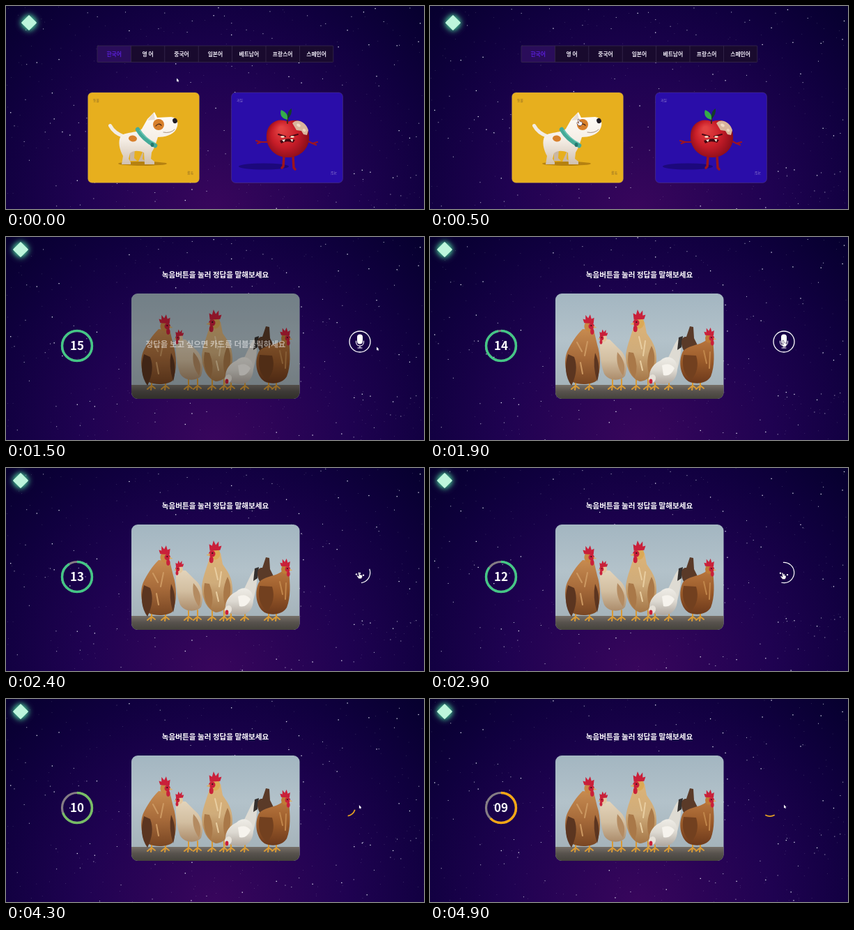
These frames come from a looping animation (600 by 291 pixels, 5000 ms). An HTML page with a canvas:

```html
<!DOCTYPE html>
<html lang="ko">
<head>
<meta charset="utf-8">
<title>Word card game</title>
<style>
html, body { margin: 0; width: 100%; height: 100%; overflow: hidden; background: #0a0030; }
canvas { display: block; width: 600px; height: 291px; }
</style>
</head>
<body>
<canvas id="stage" width="600" height="291"></canvas>
<script>
const W = 600, H = 291, LOOP = 5000, STEP = 100;
const START_AT = 700, GAME_AT = 1200, LISTEN_AT = 2100, CHECK_AT = 4300;
const FONT = '"Noto Sans CJK KR", "Noto Sans CJK", sans-serif';
const c = document.getElementById('stage').getContext('2d');
const rad = d => d * Math.PI / 180;
const clamp = v => Math.max(0, Math.min(1, v));
const mix = (a, b, p) => a + (b - a) * p;

// ---------- helpers ----------
function path(d, fill, stroke, width = 1) {
  const p = new Path2D(d);
  if (fill) { c.fillStyle = fill; c.fill(p); }
  if (stroke) {
    c.strokeStyle = stroke;
    c.lineWidth = width;
    c.lineCap = c.lineJoin = 'round';
    c.stroke(p);
  }
}

function oval(x, y, rx, ry, fill, turn = 0) {
  c.beginPath();
  c.ellipse(x, y, rx, ry, rad(turn), 0, 7);
  c.fillStyle = fill;
  c.fill();
}

function box(x, y, w, h, r, fill, stroke, width = 1) {
  c.beginPath();
  c.roundRect(x, y, w, h, r);
  if (fill) { c.fillStyle = fill; c.fill(); }
  if (stroke) { c.strokeStyle = stroke; c.lineWidth = width; c.stroke(); }
}

function arc(x, y, r, from, to, color, width) {
  c.beginPath();
  c.arc(x, y, r, rad(from), rad(to));
  c.strokeStyle = color;
  c.lineWidth = width;
  c.lineCap = 'butt';
  c.stroke();
}

function label(s, x, y, size, color, weight = 700) {
  c.font = `${weight} ${size}px ${FONT}`;
  c.textAlign = 'center';
  c.textBaseline = 'alphabetic';
  c.fillStyle = color;
  c.fillText(s, x, y + size * 0.36);
}

function shade(y0, y1, ...colors) {
  const g = c.createLinearGradient(0, y0, 0, y1);
  colors.forEach((k, i) => g.addColorStop(i / (colors.length - 1), k));
  return g;
}

// ---------- sky ----------
function random(seed) {
  return () => (seed = seed * 16807 % 2147483647) / 2147483647;
}

// Three star layers rise at different speeds and wrap around
const TILE = 625;
const layers = [
  { n: 600, size: 0.5, speed: 20, alpha: 0.6 },
  { n: 190, size: 0.95, speed: 10, alpha: 0.9 },
  { n: 90, size: 1.25, speed: 6.7, alpha: 1 }
].map((l, i) => {
  const next = random(4271 + i * 977);
  return { ...l, stars: Array.from({ length: l.n }, () => [next() * TILE, next() * TILE]) };
});

function sky(t) {
  c.save();
  c.translate(300, H);
  c.scale(424, 411);
  const g = c.createRadialGradient(0, 0, 0, 0, 0, 1);
  g.addColorStop(0, '#38065c');
  g.addColorStop(0.45, '#1f0251');
  g.addColorStop(0.75, '#10003f');
  g.addColorStop(1, '#06002e');
  c.fillStyle = g;
  c.fillRect(-1, -1, 2, 1);
  c.restore();
  for (const l of layers) {
    c.fillStyle = `rgba(240,240,255,${l.alpha})`;
    for (const [x, y] of l.stars) {
      const sy = (y - l.speed * t / 1000 + TILE) % TILE;
      if (sy < H) c.fillRect(x, sy, l.size, l.size);
    }
  }
}

function gem(x, y) {
  c.save();
  c.translate(x, y);
  c.rotate(Math.PI / 4);
  c.shadowColor = '#4fd6a0';
  c.shadowBlur = 10;
  for (let i = 0; i < 2; i++) box(-7.8, -7.8, 15.6, 15.6, 1, '#bdf5dc');
  c.restore();
}

// ---------- category page ----------
const langs = ['한국어', '영 어', '중국어', '일본어', '베트남어', '프랑스어', '스페인어'];

function tabs() {
  const x = 131, y = 57, w = 48.4, h = 23.5;
  langs.forEach((name, i) => {
    c.fillStyle = i ? '#190a2e' : '#2a0d5a';
    c.fillRect(x + i * w, y, w, h);
    if (i) {
      c.fillStyle = '#372a4c';
      c.fillRect(x + i * w - 0.4, y, 0.8, h);
    }
    label(name, x + (i + 0.5) * w, y + 11.8, 7.8, i ? '#eeeaf5' : '#5a1fd8');
  });
  box(x, y, w * 7, h, 1, null, '#372a4c', 0.8);
}

function card(x, color, name, ink) {
  box(x, 124, 160, 129.5, 6, color, 'rgba(120,110,130,.45)', 0.6);
  label(name, x + 12, 135, 4.8, ink, 500);
  c.save();
  c.translate(x + 147, 240);
  c.rotate(Math.PI);
  label(name, 0, 0, 4.8, ink, 500);
  c.restore();
}

function dog() {
  oval(196, 226, 35, 3, 'rgba(120,75,0,.45)');
  path('M149.5 171.5Q155 182 169 187', null, '#f2ece4', 5);
  path('M185 205L184 218L188 222H178V205ZM198 205L196 219L200 223H190Z', '#c9b7a4');
  path('M165 186C174 180 190 182 195 176L203 162L213 152L217 160L237 159' +
    'C246 160 249 168 244 177C240 185 227 188 218 188C215 197 213 204 209 210' +
    'L208 219L213 223V227H199L198 210C190 207 183 207 178 211L176 219L179 224V227H166' +
    'L168 215C163 206 160 194 165 186Z', shade(155, 228, '#fffdf8', '#f5eee6', '#cfbfae'));
  path('M203 164L212 153L214 163Z', '#e9ded4');
  oval(182, 190, 6, 4.5, '#d8802c', 8);
  oval(219, 170, 8, 8, '#d8802c');
  path('M215 172Q219 167 223 171', null, '#442414', 1.2);
  oval(242.5, 164.5, 3.3, 3.8, '#201c24', -20);
  path('M226 181Q236 183 242 177', null, '#8e7462', 0.8);
  path('M189 177Q197 191 214 200', null, '#45aa98', 6.5);
  path('M192 178Q199 189 213 196', null, '#71cdb9', 1.2);
  oval(210, 199, 2.4, 3, '#24776f');
}

function apple() {
  oval(370, 230, 36, 4.5, '#1c087c');
  path('M376 195L366 195L359 193M366 195L361 197M432 193L440 197L447 195M440 197L445 199',
    null, '#9e141f', 2.2);
  path('M399 215L398 230L396 232M412 215L413 232L415 234', null, '#9c141c', 3.5);
  const g = c.createRadialGradient(395, 176, 3, 404, 190, 34);
  g.addColorStop(0, '#e24242');
  g.addColorStop(0.5, '#c81d28');
  g.addColorStop(1, '#7e0a18');
  path('M404 166C391 159 375 168 374 184C372 203 387 217 403 217' +
    'C422 218 436 204 435 187C435 168 420 159 404 166Z', g);
  path('M404 168Q403 158 407 153', null, '#492515', 2);
  path('M404 163C394 161 393 154 395 149C402 152 405 156 404 163Z', '#35ac49');
  path('M404 162Q403 150 410 147Q411 156 404 162Z', '#123d29');
  path('M411 168C418 160 431 167 434 178L432 185L427 184L424 179L417 178Z', '#d9b69c');
  oval(420, 171, 3, 2, '#f2dcc3', 30);
  oval(428, 178, 2.5, 2, '#efd6bc', 40);
  path('M391 184L401 187M408 187L419 184', null, '#4b0814', 2);
  oval(397, 187.5, 2.8, 1.3, '#fff0d4');
  oval(411, 187.5, 2.8, 1.3, '#fff0d4');
  path('M393 193Q404 188 415 192L412 196Q403 192 395 197Z', '#430611');
  path('M396 192L399 195L401 191M408 191L411 195L412 191', '#fff3df');
}

function categoryPage() {
  gem(33, 24);
  tabs();
  card(117.5, '#e7af1e', '동물', '#8c6a25');
  dog();
  card(323.5, '#2a0da9', '과일', '#8d7cce');
  apple();
}

// ---------- start page ----------
function startPage() {
  gem(21, 18);
  box(273, 125, 55, 17.5, 7, '#190a27', '#504b52', 1.6);
  label('게임 시작', 300.5, 133.7, 9, '#fff');
}

// ---------- game page ----------
const RED = '#c9203a';

function feet(...xs) {
  for (const x of xs) {
    path(`M${x} 204V214M${x - 6} 218L${x} 213L${x + 5} 217M${x} 213L${x - 1} 219`, null, '#d99a35', 2);
  }
}

// Head with comb, face, beak and wattle; dir is the way it looks
function head(x, y, s, dir, color) {
  c.save();
  c.translate(x, y);
  c.scale(s * dir, s);
  oval(0, 0, 7, 8, color);
  path('M-7 -5L-9 -11L-5 -10L-5 -17L-1 -12L2 -18L4 -11L8 -13L7 -4Z', RED);
  oval(4, 0, 4.5, 4.5, RED);
  oval(5, 8, 2.8, 4.5, RED);
  path('M7 -1L12 2L7 3Z', '#d8ae68');
  oval(3.5, -1, 1, 1, '#251510');
  c.restore();
}

function photo() {
  c.fillStyle = shade(81, 214, '#a3b6c1', '#b3c2ca', '#a5b3ba');
  c.fillRect(180, 81, 242, 151);
  c.fillStyle = shade(211, 232, '#7a736b', '#57524d', '#45433c');
  c.fillRect(180, 212, 242, 20);

  feet(209, 229, 262, 275, 296, 313, 323, 343, 377, 388);

  path('M219 132C209 142 203 152 197 164C191 179 195 198 203 207C214 213 231 212 239 206' +
    'C246 192 245 169 240 154L235 133Z', shade(132, 214, '#c78b50', '#a66a3a', '#754321'));
  path('M198 168Q190 195 203 213Q214 191 207 172ZM237 166Q246 185 240 207Q233 185 237 166Z', '#5b3520');
  path('M211 151L218 164M226 150L222 170M216 180L219 196', null, '#cc9861', 2);
  head(228, 128, 0.95, 1, '#c98744');

  path('M244 146C243 162 245 184 250 196C256 207 274 207 280 199C285 184 281 168 272 161L258 147Z',
    shade(145, 208, '#e4d5bc', '#d2bea0', '#a78665'));
  path('M269 165Q284 181 277 199Q266 184 269 165Z', '#b48b61');
  head(249, 145, 0.7, -1, '#e2c79e');

  path('M294 122C290 139 283 153 281 169C281 188 289 203 301 207C316 206 325 193 325 174' +
    'C325 157 318 148 311 138L308 122Z', shade(122, 208, '#ddb376', '#cfac7b', '#a37445'));
  path('M285 165Q281 189 294 202Q300 185 292 166ZM318 156Q328 175 315 200Q308 177 318 156Z', '#a97848');
  path('M300 143L304 160M309 149L306 170M302 178L305 191', null, '#e8cda0', 2);
  head(300, 123, 1.05, -1, '#dba955');

  path('M338 180C346 167 350 153 357 145C362 150 361 170 355 190Z', '#dedbd3');
  path('M355 162L357 144L363 142L361 158Z', '#35302e');
  path('M315 202C314 189 322 181 331 177C341 167 355 174 355 188C355 204 346 211 334 211' +
    'C326 211 321 207 315 206Z', shade(172, 211, '#efede7', '#dcd8d0', '#aea69e'));
  path('M333 184Q344 179 351 188Q345 201 335 198Z', '#f6f3ed');
  oval(319, 203, 5, 6, '#e6e1d8', 20);
  oval(317, 207, 2.4, 3.4, RED);
  path('M314 209L312 214L317 211Z', '#d5aa61');

  path('M365 164C358 152 361 142 368 143L373 128L378 129L379 145L385 157Z', '#5a3a28');
  path('M396 148C387 156 372 154 363 164C356 178 359 199 371 207C382 212 397 210 403 200' +
    'C409 185 408 166 406 147Z', shade(146, 212, '#b9773f', '#985929', '#69371b'));
  path('M364 169Q359 193 375 205Q388 190 382 170Z', '#72401f');
  path('M393 163L397 181M402 165L401 188', null, '#c0854a', 2);
  head(401, 145, 0.85, 1, '#c07a36');
}

function game(t) {
  gem(21, 18);
  label('녹음버튼을 눌러 정답을 말해보세요', 300.5, 54, 10.6, '#fff', 900);

  c.save();
  c.beginPath();
  c.roundRect(180, 81, 241.5, 151, 9);
  c.clip();
  photo();
  const hover = t < 1400 ? clamp((t - GAME_AT) / 200) : clamp(1 - (t - 1400) / 250);
  if (hover) {
    c.fillStyle = `rgba(0,0,0,${0.5 * hover})`;
    c.fillRect(180, 81, 242, 151);
    label('정답을 보고 싶으면 카드를 더블클릭하세요', 301, 154, 11.5, `rgba(255,255,255,${0.85 * hover})`);
  }
  c.restore();

  timer(t);
  if (t < LISTEN_AT) mic();
  else if (t < CHECK_AT) listening(t - 2900);
  else checking(t - 4900);
}

function timer(t) {
  const total = 15, x = 102, y = 156, r = 21.5;
  const passed = Math.max(0, (t - 1640) / 620);
  const ticks = t < 1640 ? 0 : Math.floor(passed) + 1;
  const part = n => { const f = (total - n) / total; return n ? f - (1 - f) / total : 1; };
  const left = ticks ? mix(part(ticks - 1), part(ticks), passed % 1) : 1;
  const warm = clamp(passed - 4);
  const color = `rgb(${mix(68, 244, warm)},${mix(198, 166, warm)},${mix(134, 20, warm)})`;
  arc(x, y, r, 0, 360, '#857d84', 3.2);
  arc(x, y, r, -90, -90 + 360 * left, color, 3.4);
  label(String(total - ticks).padStart(2, '0'), x, y + 0.3, 17, '#fff', 900);
}

function mic() {
  arc(508, 150, 15, 0, 360, '#fff', 1.3);
  box(504, 139.5, 8, 14, 4, '#fff');
  path('M502.5 149V151Q503 156 508 156Q513 156 513.5 151V149M508 156V159M505 159H511', null, '#fff', 1.1);
}

const TURN = 0.669, PULSE = 670;

// Turning arc that grows and shrinks around three hopping dots
function listening(dt) {
  const wave = shift => Math.cos(2 * Math.PI * (dt / PULSE - shift));
  const half = 60 + 40 * wave(-0.03), mid = 5 + dt * TURN;
  arc(508, 150, 14.7, mid - half, mid + half, '#fff', 1.2);
  for (let i = 0; i < 3; i++) oval(503 + i * 5, 152.3 - 1.6 * wave(i / 3), 1.2, 1.2, '#fff');
}

function checking(dt) {
  const mid = 90 + dt * TURN;
  arc(488, 154.5, 13.5, mid - 30, mid + 30, '#e5a022', 1.8);
}

// ---------- pointer ----------
const moves = [
  [0, 246, 106], [600, 212, 172], [800, 212, 172], [1100, 300, 136], [1200, 300, 136],
  [1500, 533, 160], [1800, 508, 153], [2900, 507, 155], [3800, 507, 155], [4900, 509, 154]
];

function pointer(t) {
  const i = Math.max(1, moves.findIndex(m => m[0] >= t));
  const [t0, x0, y0] = moves[i - 1], [t1, x1, y1] = moves[i];
  const p = clamp((t - t0) / (t1 - t0)), e = p * p * (3 - 2 * p);
  const hand = t >= 300 && t < START_AT || t >= 1100 && t < GAME_AT || t >= 1800 && t < CHECK_AT;
  c.save();
  c.translate(mix(x0, x1, e), mix(y0, y1, e));
  if (hand) {
    path('M-2 -4.5L-0.5 -5L0.5 -1.5L4 -0.5L4 2L2.5 4.5H-1L-4 0.5L-3 -0.2L-1 1Z', '#fff', '#24143d', 0.5);
  } else {
    path('M-1 -2.5V2.5L0.2 1.6L1 3.2L1.8 2.8L1.1 1.3H2.6Z', '#fff');
  }
  c.restore();
}

function draw(t) {
  sky(t);
  if (t < START_AT) categoryPage();
  else if (t < GAME_AT) startPage();
  else game(t);
  pointer(t);
}

const begin = performance.now();
function tick() {
  const t = (performance.now() - begin) % LOOP;
  draw(Math.floor(t / STEP) * STEP);
  requestAnimationFrame(tick);
}
tick();
</script>
</body>
</html>
```
